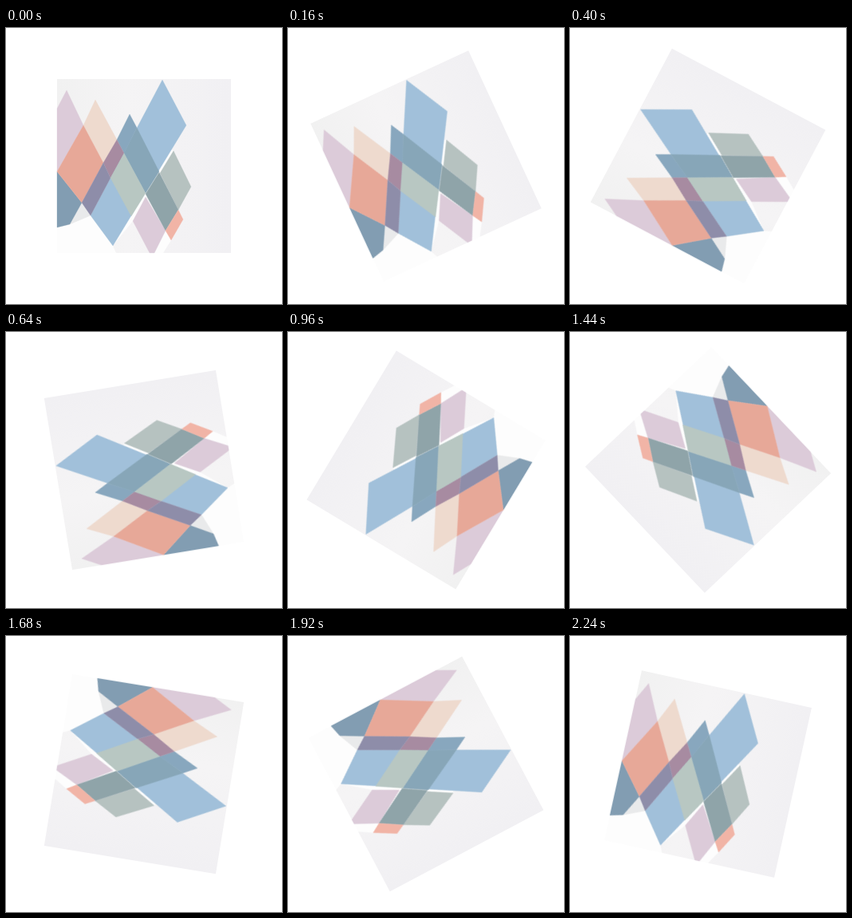
An HTML page for the animation above (2.32 s loop, 346x346 px).

```html
<!DOCTYPE html>
<html lang="en">
<head>
<meta charset="utf-8">
<title>Turning diamonds</title>
<style>
  html, body { margin: 0; width: 100%; height: 100%; overflow: hidden; background: #fff; }
  svg { display: block; width: 100vw; height: 100vh; }
  .card {
    transform-origin: 173px 173px;
    animation: turn 2320ms steps(29, end) infinite;
  }
  .card polygon { stroke-width: .3; }
  @keyframes turn { to { transform: rotate(-360deg); } }

  .white   { fill: #fdfdfd; }
  .pale    { fill: #e9eaeb; stroke: #e9eaeb; }
  .mauve   { fill: #dccbd9; stroke: #dccbd9; }
  .peach   { fill: #eedace; stroke: #eedace; }
  .orange  { fill: #e7a898; stroke: #e7a898; }
  .coral   { fill: #f1b4a6; stroke: #f1b4a6; }
  .plum    { fill: #a78ba1; stroke: #a78ba1; }
  .violet  { fill: #8e8da9; stroke: #8e8da9; }
  .sky     { fill: #a1c0da; stroke: #a1c0da; }
  .steel   { fill: #88a7be; stroke: #88a7be; }
  .lagoon  { fill: #87a6b8; stroke: #87a6b8; }
  .slate   { fill: #829db2; stroke: #829db2; }
  .sage    { fill: #b8c7c2; stroke: #b8c7c2; }
  .ash     { fill: #b6c2c0; stroke: #b6c2c0; }
  .teal    { fill: #8fa4a9; stroke: #8fa4a9; }
</style>
</head>
<body>
<svg viewBox="0 0 346 346" aria-hidden="true">
  <defs>
    <linearGradient id="paper">
      <stop offset="0" stop-color="#f1f1f1"/>
      <stop offset=".4" stop-color="#f5f4f5"/>
      <stop offset="1" stop-color="#f1f0f3"/>
    </linearGradient>
  </defs>
  <g class="card">
    <rect x="64" y="64" width="218" height="218" fill="url(#paper)"/>

    <!-- light gaps -->
    <polygon class="white" points="64,250 80,246 106,235 134,273 138,282 64,282"/>
    <polygon class="white" points="207,152 210,154 159,242 134,273"/>
    <polygon class="white" points="200,254 207,266 197,282 186,282"/>
    <polygon class="pale" points="95,219 106,235 80,246"/>

    <!-- left cluster -->
    <polygon class="mauve" points="76,78 97,122 64,180 64,101"/>
    <polygon class="slate" points="64,180 95,219 80,246 64,250"/>
    <polygon class="peach" points="112,90 139,140 122,169 97,122"/>
    <polygon class="orange" points="97,122 122,169 95,219 64,180"/>

    <!-- long blue bands and their overlaps -->
    <polygon class="sky" points="196,65 226,122 134,273 106,235"/>
    <polygon class="steel" points="155,108 164,125 148,157 139,140"/>
    <polygon class="plum" points="139,140 148,157 131,188 122,169"/>
    <polygon class="violet" points="122,169 131,188 106,235 95,219"/>
    <polygon class="lagoon" points="164,125 192,180 175,207 148,157"/>
    <polygon class="sage" points="148,157 175,207 157,236 131,188"/>

    <!-- right cluster -->
    <polygon class="mauve" points="175,212 200,254 186,282 180,282 159,242"/>
    <polygon class="ash" points="210,154 232,199 216,228 193,182"/>
    <polygon class="teal" points="192,181 216,228 200,254 175,208"/>
    <polygon class="coral" points="216,228 222,240 207,266 200,254"/>
  </g>
</svg>
</body>
</html>
```
